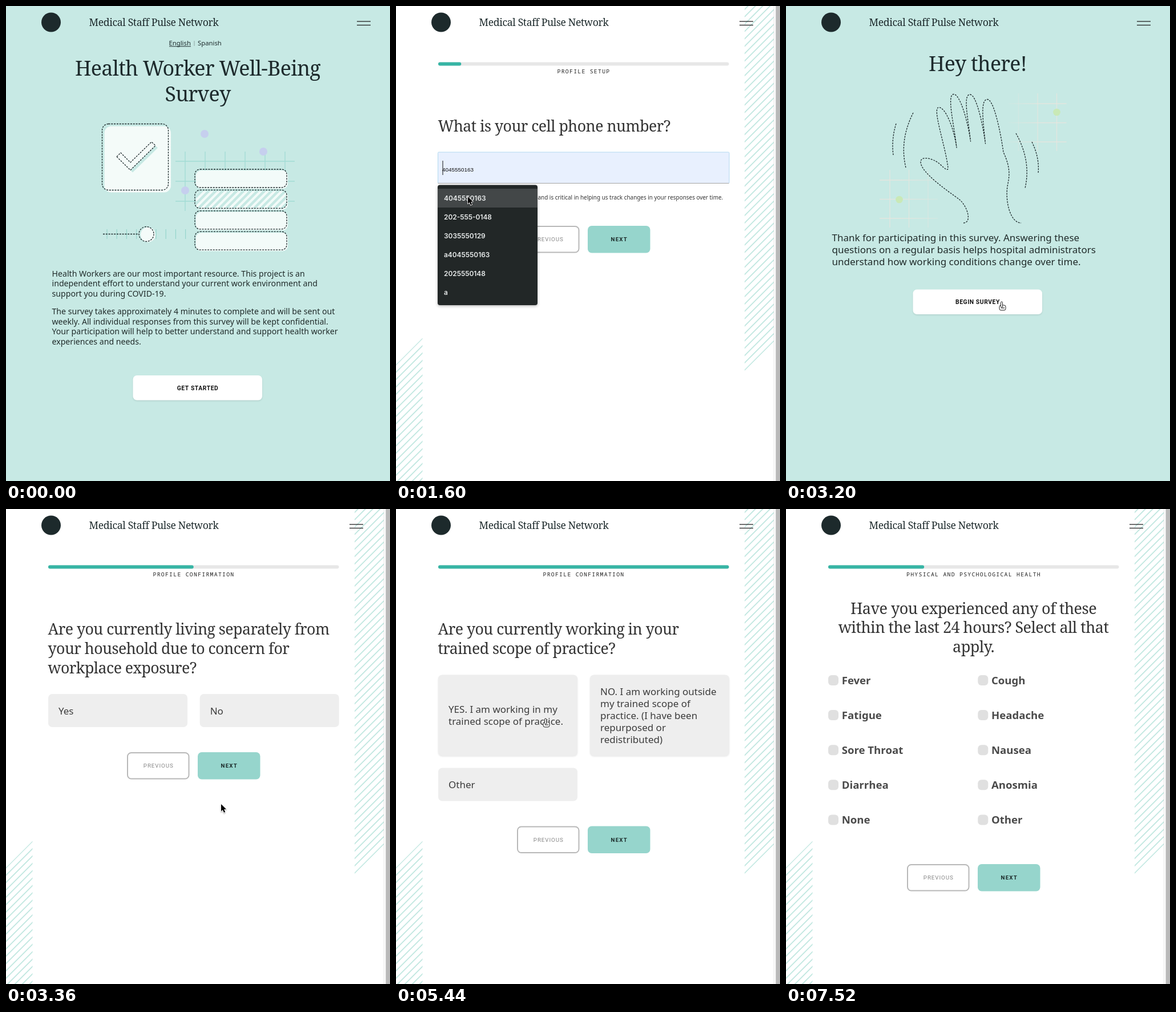
These frames come from a looping animation (673x832 px, 7.68 s). An HTML page with a canvas:

```html
<!DOCTYPE html>
<html lang="en">
<head>
<meta charset="utf-8">
<title>Well-Being Survey</title>
<style>
html, body { margin: 0; width: 100%; height: 100%; overflow: hidden; background: #c7e9e4; }
canvas { display: block; width: 673px; height: 832px; }
</style>
</head>
<body>
<canvas id="stage"></canvas>
<script>
const W = 673, H = 832, STEP = 160, COUNT = 48;
const TEAL = '#c7e9e4', MINT = '#96d5cc', INK = '#1d2a2c', GREY = '#eeeeee', CARD = '#f4fbf9';
const SERIF = '"Noto Serif", serif', SANS = '"Noto Sans", sans-serif', CAPS = 'Roboto, sans-serif';
const MONO = '"Noto Sans Mono", monospace', UI = 'Inter, sans-serif', INPUT = '"Liberation Sans", sans-serif';
const BRAND = 'Medical Staff Pulse Network';
const PHONE = '4045550163';
const CONTACTS = [PHONE, '202-555-0148', '3035550129', 'a' + PHONE, '2025550148', 'a'];

const canvas = document.getElementById('stage');
const ctx = canvas.getContext('2d');
const ratio = window.devicePixelRatio || 1;
canvas.width = W * ratio;
canvas.height = H * ratio;

let mouse = { x: 0, y: 0 };
let zones = [];

function zone(x, y, w, h, kind = glove) {
  zones.push({ x, y, w, h, kind });
}

function inside(x, y, w, h) {
  return mouse.x > x && mouse.x < x + w && mouse.y > y && mouse.y < y + h;
}

function text(str, x, y, size, o = {}) {
  ctx.font = `${o.weight || 400} ${size}px ${o.font || SANS}`;
  ctx.letterSpacing = (o.gap || 0) + 'px';
  ctx.textAlign = o.align || 'left';
  ctx.fillStyle = o.color || '#202b2a';
  ctx.fillText(str, x, y);
}

function lines(list, x, y, size, lead, o) {
  list.forEach((s, i) => text(s, x, y + i * lead, size, o));
}

function title(list, x, y, size, lead, align, color = '#333') {
  lines(list, x, y, size, lead, { font: SERIF, gap: -0.02 * size, align, color });
}

function question(...list) {
  title(list, 73.5, 220, 26.7, 33.75);
}

function paint(fill, stroke, width = 1.3) {
  if (fill) { ctx.fillStyle = fill; ctx.fill(); }
  if (stroke) { ctx.strokeStyle = stroke; ctx.lineWidth = width; ctx.stroke(); }
}

function box(x, y, w, h, r, fill, stroke, width) {
  ctx.beginPath();
  ctx.roundRect(x, y, w, h, r);
  paint(fill, stroke, width);
}

function dot(x, y, r, fill, stroke) {
  ctx.beginPath();
  ctx.arc(x, y, r, 0, Math.PI * 2);
  paint(fill, stroke);
}

function poly(pts, dx = 0, dy = 0) {
  ctx.beginPath();
  pts.forEach(([x, y]) => ctx.lineTo(x + dx, y + dy));
  ctx.closePath();
}

function seg(x1, y1, x2, y2, color, width = 1.3) {
  ctx.beginPath();
  ctx.moveTo(x1, y1);
  ctx.lineTo(x2, y2);
  paint(null, color, width);
}

function dashed(draw) {
  ctx.save();
  ctx.setLineDash([3, 1.8]);
  draw();
  ctx.restore();
}

function shadowed(blur, alpha, draw) {
  ctx.save();
  ctx.shadowColor = `rgba(0,0,0,${alpha})`;
  ctx.shadowBlur = blur;
  ctx.shadowOffsetY = 1.5;
  draw();
  ctx.restore();
}

// Rising diagonals x + y = c, clipped to the current path
function hatch(x1, y1, x2, y2, start, period, color, width) {
  ctx.save();
  ctx.clip();
  for (let c = start; c < x2 + y2; c += period) {
    if (c > x1 + y1) seg(x1 - 5, c - x1 + 5, x2 + 5, c - x2 - 5, color, width);
  }
  ctx.restore();
}

function header(menuX) {
  dot(79, 28.5, 17, INK);
  text(BRAND, 145.5, 35, 17.6, { font: SERIF, gap: -0.35, color: INK });
  for (const y of [27, 33.5]) seg(menuX, y, menuX + 24, y, '#222');
}

function tealPage() {
  ctx.fillStyle = TEAL;
  ctx.fillRect(0, 0, W, H);
  header(615);
}

function wideButton(y, label) {
  shadowed(3, 0.1, () => box(222.5, y, 226.5, 43.5, 7, '#fff'));
  text(label, 336, y + 25.8, 10.3, { font: CAPS, weight: 600, gap: 0.6, align: 'center', color: '#111' });
  zone(222, y, 227, 44);
}

function welcome() {
  tealPage();
  text('English', 285.5, 69, 11.3, { color: INK });
  seg(286, 70.8, 324, 70.8, INK, 1);
  seg(330, 61, 330, 70, '#8fa5a2', 1);
  text('Spanish', 336, 69, 11.3, { color: INK });
  title(['Health Worker Well-Being', 'Survey'], 336, 122, 35.9, 45, 'center', INK);
  checkCard();
  stack();
  slider();
  lines(['Health Workers are our most important resource. This project is an',
    'independent effort to understand your current work environment and',
    'support you during COVID-19.'], 80.5, 473.5, 14.15, 17.5);
  lines(['The survey takes approximately 4 minutes to complete and will be sent out',
    'weekly. All individual responses from this survey will be kept confidential.',
    'Your participation will help to better understand and support health worker',
    'experiences and needs.'], 80.5, 540.3, 14.15, 17.5);
  wideButton(647, 'GET STARTED');
}

function checkCard() {
  const tick = [[194, 264], [201, 257], [218, 274], [255, 238], [262, 244.5], [218, 287.5]];
  box(172.5, 210.5, 116.5, 116, 12, CARD);
  poly(tick, 4, 4);
  paint(TEAL);
  poly(tick);
  paint(CARD);
  dashed(() => {
    paint(null, INK);
    box(168.5, 206.5, 116, 116, 11, null, INK);
  });
}

function stack() {
  const rule = '#a2dcd4';
  for (let i = 0; i < 6; i++) seg(314 + i * 35, 255, 314 + i * 35, i ? 290 : 359, rule);
  for (let i = 0; i < 3; i++) seg(297, 272 + i * 35, 506, 272 + i * 35, rule);
  [[348, 224], [451, 255], [314, 323]].forEach(([x, y]) => dot(x, y, 7, '#c6cfee'));
  for (let i = 0; i < 4; i++) {
    const y = 286 + i * 36.4;
    box(333, y + 2, 161, 32, 9, 'rgba(247,253,251,0.92)');
    if (i === 1) {
      box(331, y, 161, 32, 9);
      hatch(331, y, 492, y + 32, 655, 12.2, TEAL, 4.5);
    }
    dashed(() => box(331, y, 161, 32, 9, null, INK));
  }
}

function slider() {
  for (let i = 0; i < 9; i++) seg(177 + i * 17.2, 391, 177 + i * 17.2, 408, MINT, 1.2);
  dot(249, 400.5, 13, CARD);
  dashed(() => {
    seg(170, 399.5, 233, 399.5, INK, 1.5);
    dot(246, 399.5, 13, null, INK);
  });
}

// Fingers rise from one gap to a tip and fall to the next gap
function hand() {
  const tips = [[268, 177.5], [294, 154.5], [322.5, 155], [353, 163.5]];
  const gaps = [[284, 284], [299, 248], [323.5, 237], [349.5, 241], [381, 256]];
  ctx.beginPath();
  ctx.moveTo(311, 380);
  ctx.bezierCurveTo(326, 380, 319, 352, 304, 339);
  ctx.bezierCurveTo(285, 325, 236, 292, 236, 273);
  ctx.bezierCurveTo(236, 262, 258, 266, 271, 278);
  ctx.quadraticCurveTo(284, 291, ...gaps[0]);
  tips.forEach(([x, y], i) => {
    const [ax, ay] = gaps[i], [bx, by] = gaps[i + 1];
    ctx.bezierCurveTo(ax - 4, ay - 38, x - 13, y, x, y);
    ctx.bezierCurveTo(x + 11, y, bx - 5, by - 36, bx, by);
  });
  ctx.bezierCurveTo(395, 286, 391, 300, 388, 316);
  ctx.bezierCurveTo(384, 345, 394, 380, 412, 380);
  paint(null, INK);
}

function bow(x1, y1, x2, y2, bend) {
  ctx.beginPath();
  ctx.moveTo(x1, y1);
  ctx.quadraticCurveTo((x1 + x2) / 2 + bend, (y1 + y2) / 2, x2, y2);
  paint(null, INK);
}

function fadeGrid(x, y, from, to) {
  const g = ctx.createLinearGradient(from, 0, to, 0);
  g.addColorStop(0, 'rgba(232,229,222,0.1)');
  g.addColorStop(1, 'rgba(232,229,222,0.85)');
  for (let o = 18; o < 90; o += 33.5) {
    seg(x, y + o, x + 102, y + o, g);
    seg(x + o, y, x + o, y + 101, g);
  }
}

function hello() {
  tealPage();
  title(['Hey there!'], 336, 113.5, 35.7, 45, 'center', INK);
  fadeGrid(389.5, 153, 389, 450);
  fadeGrid(164, 287, 290, 200);
  dot(474.5, 186, 6.3, '#c9e9b6');
  dot(198.5, 339, 6.3, '#c9e9b6');
  dashed(() => {
    hand();
    bow(193, 206, 188, 261, -6);
    bow(223, 187, 210, 283, -18);
    bow(403, 223, 419, 319, 19);
    bow(431, 238, 442, 293, 8);
  });
  lines(['Thank for participating in this survey. Answering these',
    'questions on a regular basis helps hospital administrators',
    'understand how working conditions change over time.'], 80.5, 411.5, 17, 21);
  zone(80, 395, 464, 62, beam);
  wideButton(496.5, 'BEGIN SURVEY');
}

function whitePage(label, progress, y) {
  ctx.fillStyle = '#fff';
  ctx.fillRect(0, 0, W, H);
  poly([[611, 0], [662, 0], [662, 588], [611, 639]]);
  hatch(611, 0, 662, 639, 1249 % 12.9, 12.9, '#c0e7e0', 1.8);
  poly([[0, 628], [46.5, 581.5], [46.5, 832], [0, 832]]);
  hatch(0, 580, 46.5, 832, 628.5, 12.9, '#c0e7e0', 1.8);
  seg(662.5, 0, 662.5, H, '#e6e6e6', 1);
  ctx.fillStyle = '#b9b9b9';
  ctx.fillRect(665.5, 0, 7.5, H);
  header(602);
  box(74, 98.5, 509.5, 6, 3, '#e7e7e7');
  box(74, 98.5, 509.5 * progress, 6, 3, '#37b5a5');
  text(label, 329, 118, 9.8, { font: MONO, weight: 500, gap: 1.27, align: 'center', color: '#222' });
  const caps = { font: CAPS, gap: 1.2, align: 'center' };
  box(213, y + 1, 107.5, 45.5, 6.5, '#fff', '#b8b8b8', 2);
  text('PREVIOUS', 267.2, y + 27, 9.8, { ...caps, gap: 0.9, color: '#858585' });
  box(336, y, 109.5, 47.5, 7, MINT);
  text('NEXT', 391.3, y + 27, 9.8, { ...caps, weight: 600, color: '#1c2b2a' });
  zone(336, y, 110, 48);
}

function phone(step) {
  const focused = step > 8, preview = step === 10, filled = step > 10;
  whitePage('PROFILE SETUP', 0.079, 385);
  question('What is your cell phone number?');
  text('This information will never be shared and is critical in helping us track changes in your responses over time.',
    73.5, 338.5, 9.92, { color: '#333' });
  if (preview || filled) box(73.5, 256, 510.5, 54.5, 1.5, '#e8f0fe', '#b3d9f0', 1);
  if (preview) text(PHONE, 81, 290, 9.9, { font: INPUT, color: '#111' });
  else text(filled ? PHONE : 'Phone Number', 81.5, 290, 19.2, { color: filled ? '#222' : '#b5b5b5' });
  seg(73.5, 310.5, 583.5, 310.5, '#a5a5a5', 1.2);
  zone(73, 256, 511, 55, beam);
  if (focused && !filled) {
    seg(82, 271, 82, 296, '#111', 1);
    contactList();
  }
}

function contactList() {
  shadowed(5, 0.3, () => box(73, 313.5, 175, 210.5, 4, '#222727'));
  CONTACTS.forEach((entry, i) => {
    const y = 320 + i * 32.85;
    if (inside(73, y, 175, 32.8)) {
      ctx.fillStyle = '#434748';
      ctx.fillRect(73, y, 175, 33);
    }
    text(entry, 84, y + 21.3, 11.9, { font: UI, weight: 600, color: '#e8ebeb' });
  });
}

function option(x, y, h, list, on) {
  const draw = () => box(x, y, 244, h, 7, on ? MINT : GREY);
  if (list.length > 1) shadowed(3, 0.1, draw);
  else draw();
  const first = y + h / 2 + 6.5 - (list.length - 1) * 10.5;
  lines(list, x + 18, first, 17, 21, { color: '#3c3c3c' });
  zone(x, y, 244, h);
}

function household(step) {
  whitePage('PROFILE CONFIRMATION', 0.5, 426);
  question('Are you currently living separately from', 'your household due to concern for',
    'workplace exposure?');
  option(74, 324, 58, ['Yes'], step > 25);
  option(339.7, 324, 58, ['No']);
}

function scope(step) {
  whitePage('PROFILE CONFIRMATION', 1, 555.5);
  question('Are you currently working in your', 'trained scope of practice?');
  option(74, 290.5, 141.5, ['YES. I am working in my', 'trained scope of practice.'], step > 34);
  option(340, 290.5, 141.5, ['NO. I am working outside', 'my trained scope of', 'practice. (I have been',
    'repurposed or', 'redistributed)']);
  option(74, 453.5, 58, ['Other']);
}

function symptoms() {
  whitePage('PHYSICAL AND PSYCHOLOGICAL HEALTH', 0.33, 622);
  title(['Have you experienced any of these', 'within the last 24 hours? Select all that', 'apply.'],
    328.5, 183.5, 27, 33.75, 'center');
  ['Fever', 'Cough', 'Fatigue', 'Headache', 'Sore Throat', 'Nausea', 'Diarrhea', 'Anosmia', 'None', 'Other']
    .forEach((name, i) => {
      const x = 74 + (i % 2) * 262.3, y = 291 + (i >> 1) * 61.1;
      box(x, y, 18, 18, 6, inside(x, y, 130, 18) ? '#cbcbcb' : '#e0e0e0');
      text(name, x + 23.7, y + 15.7, 18.6, { weight: 600, color: '#4a4a4a' });
      zone(x, y, 130, 18);
    });
}

// Where the pointer turns or clicks: step, x, y
const STOPS = [[0, 480, 840], [3, 326, 672], [4, 324, 671], [8, 190, 285], [10, 126, 334],
  [14, 428, 409], [15, 434, 412], [20, 378, 518], [21, 377, 517], [23, 262, 247], [25, 190, 350],
  [29, 405, 452], [34, 262, 367], [39, 390, 580], [42, 84, 299], [44, 526, 212], [47, 480, 840]];

function track(step) {
  const k = Math.max(1, STOPS.findIndex(s => s[0] >= step));
  const [t0, x0, y0] = STOPS[k - 1], [t1, x1, y1] = STOPS[k];
  const f = (step - t0) / (t1 - t0), e = f * f * (3 - 2 * f);
  return { x: x0 + (x1 - x0) * e, y: y0 + (y1 - y0) * e };
}

function arrow(x, y) {
  poly([[0, 0], [0, 12.5], [2.8, 9.9], [5, 14.8], [7.2, 13.8], [5.1, 9], [8.9, 8.8]], x, y);
  ctx.lineJoin = 'round';
  shadowed(2, 0.3, () => paint(null, '#fff', 1.6));
  paint('#000');
}

function beam(x, y) {
  seg(x, y - 6, x, y + 7, '#333', 1);
  for (const dy of [-7, 8]) seg(x - 2.5, y + dy, x + 2.5, y + dy, '#333', 1);
}

function glove(x, y) {
  box(x - 4, y + 6, 11, 9, 3, '#fff', '#222', 1);
  box(x - 1.5, y, 3, 10, 1.5, '#fff', '#222', 1);
  for (let i = 0; i < 3; i++) seg(x + i * 2, y + 9, x + i * 2, y + 12.5, '#222', 0.8);
}

const SCENES = [[0, welcome], [4, phone], [15, hello], [21, household], [31, scope], [40, symptoms]];

function render(now) {
  const step = Math.floor(now / STEP) % COUNT;
  ctx.setTransform(ratio, 0, 0, ratio, 0, 0);
  mouse = track(step);
  zones = [];
  const [from, scene] = SCENES.filter(s => s[0] <= step).pop();
  scene(step);
  const hit = zones.find(z => inside(z.x, z.y, z.w, z.h));
  (hit ? hit.kind : arrow)(mouse.x, mouse.y);
}

let begin = null;
function tick(now) {
  if (begin === null) begin = now;
  render(now - begin);
  requestAnimationFrame(tick);
}
render(0);
requestAnimationFrame(tick);
</script>
</body>
</html>
```
